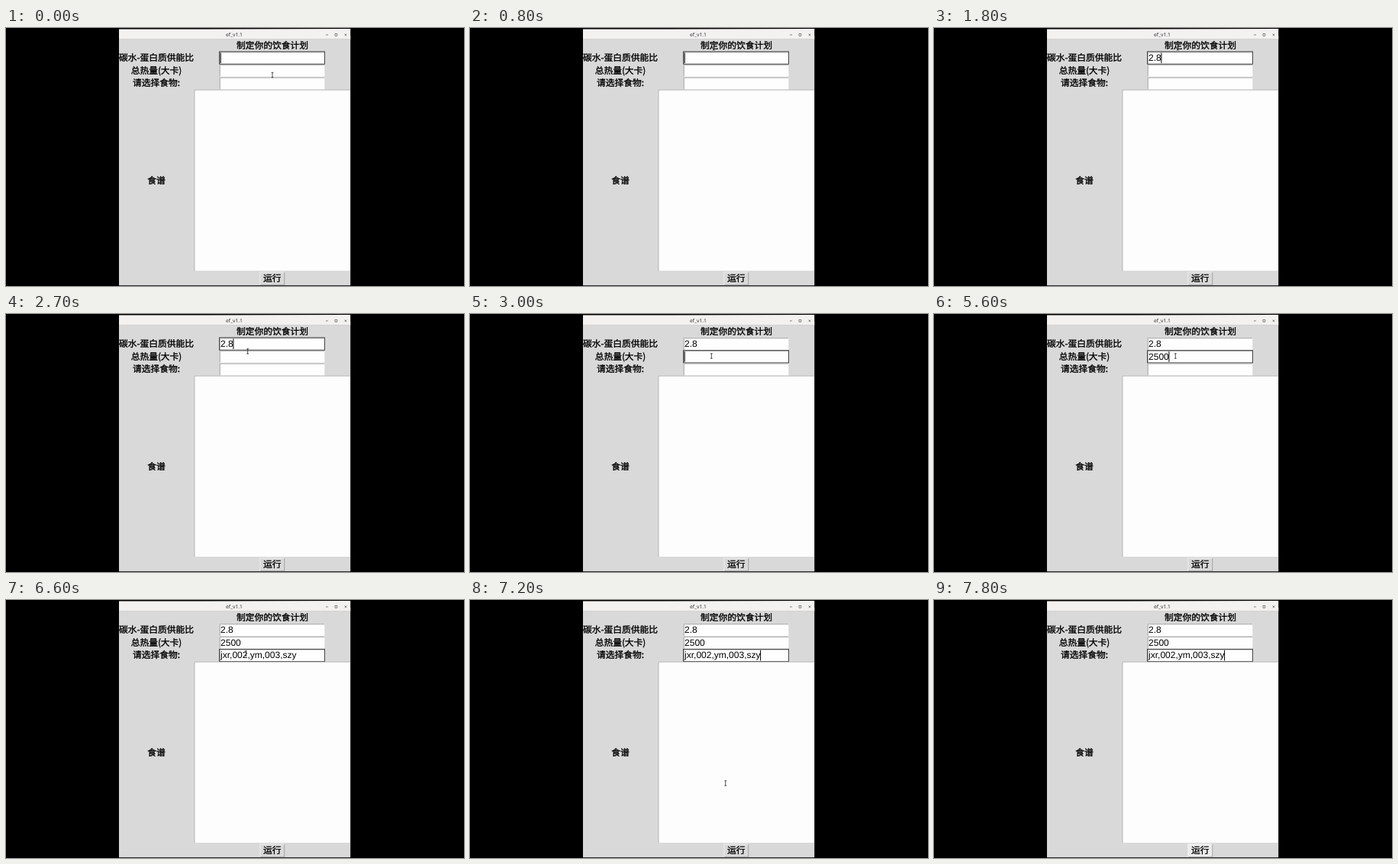
Recreate the animation shown at these times as an HTML page. Size 600 px wide and 338 px high, loop 8000 ms.

```html
<!DOCTYPE html>
<html lang="zh-CN">
<head>
<meta charset="utf-8">
<title>ef_v1.1</title>
<style>
html, body { margin: 0; width: 100%; height: 100%; overflow: hidden; background: #000; }
svg { display: block; width: 600px; height: 338px; }
text { fill: #000; text-rendering: geometricPrecision; }
.cjk { font: 500 11.75px "Noto Sans CJK SC", "Noto Sans CJK", sans-serif; text-anchor: middle; stroke: #000; stroke-width: .35px; }
.entry { font: 12px "Liberation Sans", Arial, sans-serif; white-space: pre; }
.bar { font: 6.7px "Noto Sans", sans-serif; fill: #333; text-anchor: middle; }
</style>
</head>
<body>
<svg viewBox="0 0 600 338">
  <rect width="600" height="338"/>
  <rect x="148" y="10" width="303.2" height="327.2" fill="#d9d9d9"/>
  <path d="M148 1.6L451.2 1V14.5H148z" fill="#f3f2f1"/>
  <rect x="148" y="14" width="303.2" height=".6" fill="#c8c8c8"/>
  <text class="bar" x="299" y="11.3">ef_v1.1</text>
  <path d="M419 9h3M431 7.5h2.8v2.8h-2.8zM443.6 7.6l2.6 2.6m0-2.6l-2.6 2.6" fill="none" stroke="#555" stroke-width=".7"/>

  <g class="cjk">
    <text x="349" y="27.2">制定你的饮食计划</text>
    <text x="197" y="43.2">碳水-蛋白质供能比</text>
    <text x="197" y="60">总热量(大卡)</text>
    <text x="197" y="76.4">请选择食物:</text>
    <text x="197" y="203.5">食谱</text>
  </g>

  <g id="fields"></g>

  <rect x="247" y="81" width="203.7" height="237" fill="#fdfdfd"/>
  <path d="M247 318V81.2H450.7" fill="none" stroke="#a2a2a2" stroke-width=".7"/>

  <rect id="button" x="332.5" y="319.5" width="32.5" height="17.5"/>
  <path d="M332.8 337V319.8H365" fill="none" stroke="#f4f4f4" stroke-width=".7"/>
  <path d="M333 336.7H364.7V320" fill="none" stroke="#8f8f8f" stroke-width=".7"/>
  <text class="cjk" x="348.7" y="332.2">运行</text>

  <path id="beam" d="M-1.4-3.2H1.4M0-3.2V3.2M-1.4 3.2H1.4" fill="none" stroke="#222" stroke-width=".8"/>
  <path id="arrow" d="M0 0V5.6L1.4 4.4 2.3 6.4 3.2 6 2.3 4H4z" fill="#222" stroke="#ddd" stroke-width=".5"/>
</svg>
<script>
const LOOP = 8000, STEP = 100;
const $ = id => document.getElementById(id);

// [time, value] lists; a value holds until the next time
const typed = [
  [[0, ''], [1300, '2'], [1500, '2.'], [1800, '2.8']],
  [[0, ''], [3500, '2'], [4700, '25'], [4800, '250'], [5000, '2500']],
  [[0, ''], [6600, 'jxr,002,ym,003,szy']]
];
const focus = [[0, 0], [2900, 1], [6000, 2]];
const caret = [
  [0, 1], [300, 0], [600, 1], [1200, 0], [1500, 1], [2100, 0], [2400, 1],
  [3500, 0], [3800, 1], [4400, 0], [4700, 1], [5300, 0], [5600, 1],
  [6600, 0], [6900, 1], [7500, 0], [7800, 1]
];
// pointer: [time, x, y]
const path = [
  [0, 349, 61.5], [300, 323, 39], [500, 323, 39], [800, 318, 24.5],
  [2300, 318, 24.5], [2800, 316.3, 55], [5600, 316.3, 55],
  [5800, 314.3, 70], [6800, 314.3, 70], [7400, 345, 325], [LOOP, 345, 325]
];

const at = (list, t) => list.filter(s => s[0] <= t).pop()[1];

function pointer(t) {
  const i = path.findIndex(p => p[0] > t);
  const [t0, x0, y0] = path[i - 1], [t1, x1, y1] = path[i];
  const k = (t - t0) / (t1 - t0);
  return [x0 + (x1 - x0) * k, y0 + (y1 - y0) * k];
}

function make(name, attrs, parent) {
  const el = document.createElementNS('http://www.w3.org/2000/svg', name);
  for (const key in attrs) el.setAttribute(key, attrs[key]);
  return parent.appendChild(el);
}

const rows = [30.9, 47.6, 64.3].map(y => {
  const g = make('g', { transform: `translate(279.5 ${y})` }, $('fields'));
  make('rect', { x: .5, y: .5, width: 137.3, height: 15.7, fill: '#fefefe' }, g);
  make('path', { d: 'M.8 16V.8H137.5', fill: 'none', stroke: '#858585', 'stroke-width': .7 }, g);
  return {
    ring: make('rect', { x: 0, y: .1, width: 138, height: 16.2, fill: 'none', stroke: '#444', 'stroke-width': 1 }, g),
    text: make('text', { class: 'entry', x: 1.6, y: 12.1 }, g),
    caret: make('rect', { y: 1.5, width: 1, height: 13.6 }, g)
  };
});

const show = (el, on) => el.setAttribute('visibility', on ? 'visible' : 'hidden');

function draw(t) {
  const active = at(focus, t);
  rows.forEach((row, i) => {
    row.text.textContent = at(typed[i], t);
    row.caret.setAttribute('x', 1.2 + row.text.getComputedTextLength());
    show(row.ring, i === active);
    show(row.caret, i === active && at(caret, t));
  });

  const [x, y] = pointer(t);
  const inEntry = x > 280 && x < 418 && y > 31 && y < 81;
  const inText = y >= 81 && y < 318;
  const hover = y > 319;
  $('beam').setAttribute('transform', `translate(${x} ${y})`);
  $('arrow').setAttribute('transform', `translate(${x} ${y})`);
  show($('beam'), inEntry || inText);
  show($('arrow'), !inEntry && !inText);
  $('button').setAttribute('fill', hover ? '#ececec' : '#d9d9d9');
}

const start = performance.now();
function tick() {
  const t = (performance.now() - start) % LOOP;
  draw(Math.floor(t / STEP) * STEP);
  requestAnimationFrame(tick);
}
tick();
</script>
</body>
</html>
```
